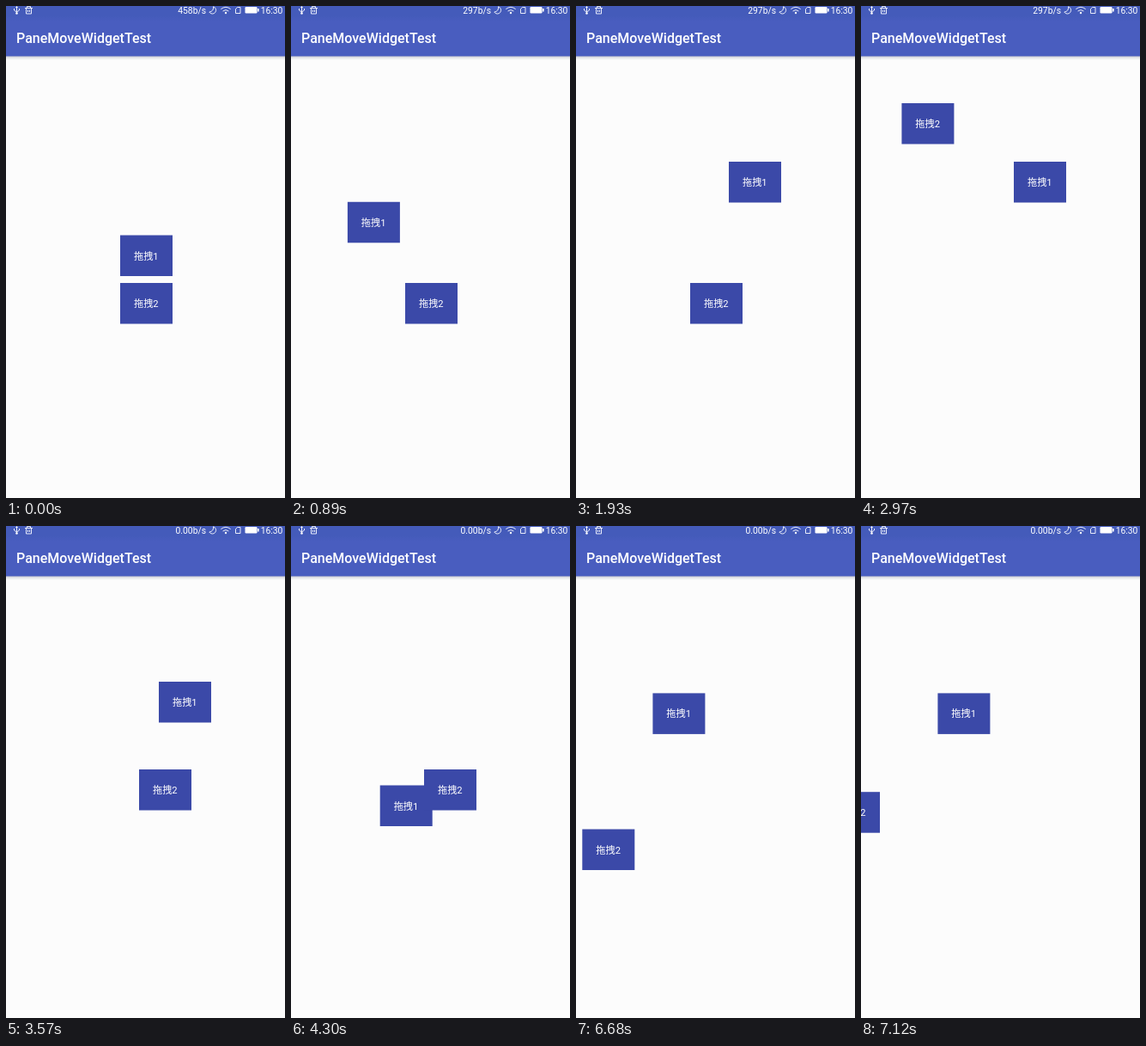
Write an HTML page that moves like this. It is 325 by 572 pixels and loops after 9200 ms.

```html
<!DOCTYPE html>
<html lang="zh">
<head>
<meta charset="utf-8">
<title>Drag demo</title>
<style>
  html, body { margin: 0; width: 100%; height: 100%; overflow: hidden; background: #fcfcfc; }
  svg { display: block; width: 325px; height: 572px; }
  text { fill: #fff; font-family: Roboto, "Noto Sans CJK SC", "Noto Sans CJK", sans-serif; }
  .title { font-size: 16px; font-weight: 500; }
  .status { font-size: 10.3px; text-anchor: end; }
  .label { font-size: 11.2px; text-anchor: middle; }
  .box rect { width: 61px; height: 47.5px; fill: #3b49a8; }
  .line { fill: none; stroke: #e8ecfa; stroke-width: 1; }
  .solid { fill: #fff; }
</style>
</head>
<body>
<svg viewBox="0 0 325 572">
  <defs>
    <linearGradient id="bar" x2="0" y2="1">
      <stop offset=".2" stop-color="#445bba"/>
      <stop offset=".3" stop-color="#495dbf"/>
    </linearGradient>
    <linearGradient id="shade" x2="0" y2="1">
      <stop offset="0" stop-color="#bcbdc8"/>
      <stop offset=".4" stop-color="#e4e4e8"/>
      <stop offset="1" stop-color="#fcfcfc"/>
    </linearGradient>
  </defs>

  <g class="box" id="box1"><rect/><text class="label" x="30.3" y="28">拖拽1</text></g>
  <g class="box" id="box2"><rect/><text class="label" x="30.3" y="28">拖拽2</text></g>

  <rect y="58" width="325" height="5" fill="url(#shade)"/>
  <rect width="325" height="58.4" fill="url(#bar)"/>
  <text class="title" x="12" y="43">PaneMoveWidgetTest</text>

  <!-- usb -->
  <path class="line" d="M12.5 1V8M9.5 3V5L12.5 7L15.5 5V3"/>
  <circle class="solid" cx="12.5" cy="8.5" r="1.3"/>
  <path class="solid" d="M11 2L12.5 0L14 2Z"/>
  <!-- bin -->
  <path class="line" d="M22 2.5H31M24.5 2V.5H28.5V2M23.5 2.5V9H29.5V2.5M25.5 4.5V7M27.5 4.5V7"/>

  <text class="status" id="speed" x="233" y="8.8"></text>
  <!-- moon -->
  <path class="line" d="M241.5 .8A4.2 4.2 0 1 1 236.8 7A5 5 0 0 0 241.5 .8Z"/>
  <!-- wifi -->
  <path class="line" d="M250.3 3.6Q256 -1 261.7 3.6M252.6 6Q256 3.2 259.4 6"/>
  <circle class="solid" cx="256" cy="8" r="1.2"/>
  <!-- sim -->
  <path class="line" d="M269.5 1.5H273V8.5H267.5V3.5Z"/>
  <!-- battery -->
  <rect class="solid" x="278.5" y="1" width="14" height="7.5" rx="1.2"/>
  <rect class="solid" x="293" y="3" width="1.6" height="3.5"/>
  <text class="status" x="322.3" y="8.8">16:30</text>
</svg>
<script>
const LOOP = 9200, TICKS = 62;
const byId = id => document.getElementById(id);
const linear = u => u;
const easeOut = u => 1 - (1 - u) ** 2;

// One stroke of the finger: a curve to `end`, pulled towards `bend`.
const stroke = (from, to, bend, end, ease = linear) => ({ from, to, bend, end, ease });

const boxes = {
  box1: {
    home: [133, 266.5],
    strokes: [
      stroke(4, 10, [5, 215], [41, 124]),
      stroke(10, 13, [178, 110], [178, 181], easeOut),
      stroke(25, 29, [165, 240], [103.7, 301.5]),
      stroke(29, 34, [75, 262], [89.4, 194.4])
    ]
  },
  box2: {
    home: [133, 322],
    strokes: [
      stroke(16, 20, [50, 215], [47.4, 113]),
      stroke(20, 24, [60, 150], [155, 283]),
      stroke(35, 38, [150, 410], [24, 367]),
      stroke(44, 48, [-10, 338], [-39, 309.2])
    ]
  }
};
// The first step of the throw across the left edge is a short nudge.
boxes.box2.strokes.splice(2, 1,
  stroke(35, 36, [153, 296], [150.5, 308.6]),
  stroke(36, 38, [149, 382], [24, 367]));

function position({ home, strokes }, tick) {
  let point = home;
  for (const { from, to, bend, end, ease } of strokes) {
    if (tick <= from) break;
    const u = ease(Math.min(1, (tick - from) / (to - from))), v = 1 - u;
    point = point.map((p, i) => v * v * p + 2 * u * v * bend[i] + u * u * end[i]);
  }
  return point;
}

const speedAt = tick => tick < 2 ? "458b/s" : tick < 22 ? "297b/s" : "0.00b/s";

const start = performance.now();
function draw() {
  const t = (performance.now() - start) % LOOP;
  // The screen refreshes in even ticks; the small lead absorbs rounding.
  const tick = Math.floor(t / LOOP * TICKS + 0.07);
  for (const id in boxes) {
    byId(id).setAttribute("transform", `translate(${position(boxes[id], tick)})`);
  }
  byId("speed").textContent = speedAt(tick);
  requestAnimationFrame(draw);
}
draw();
</script>
</body>
</html>
```
